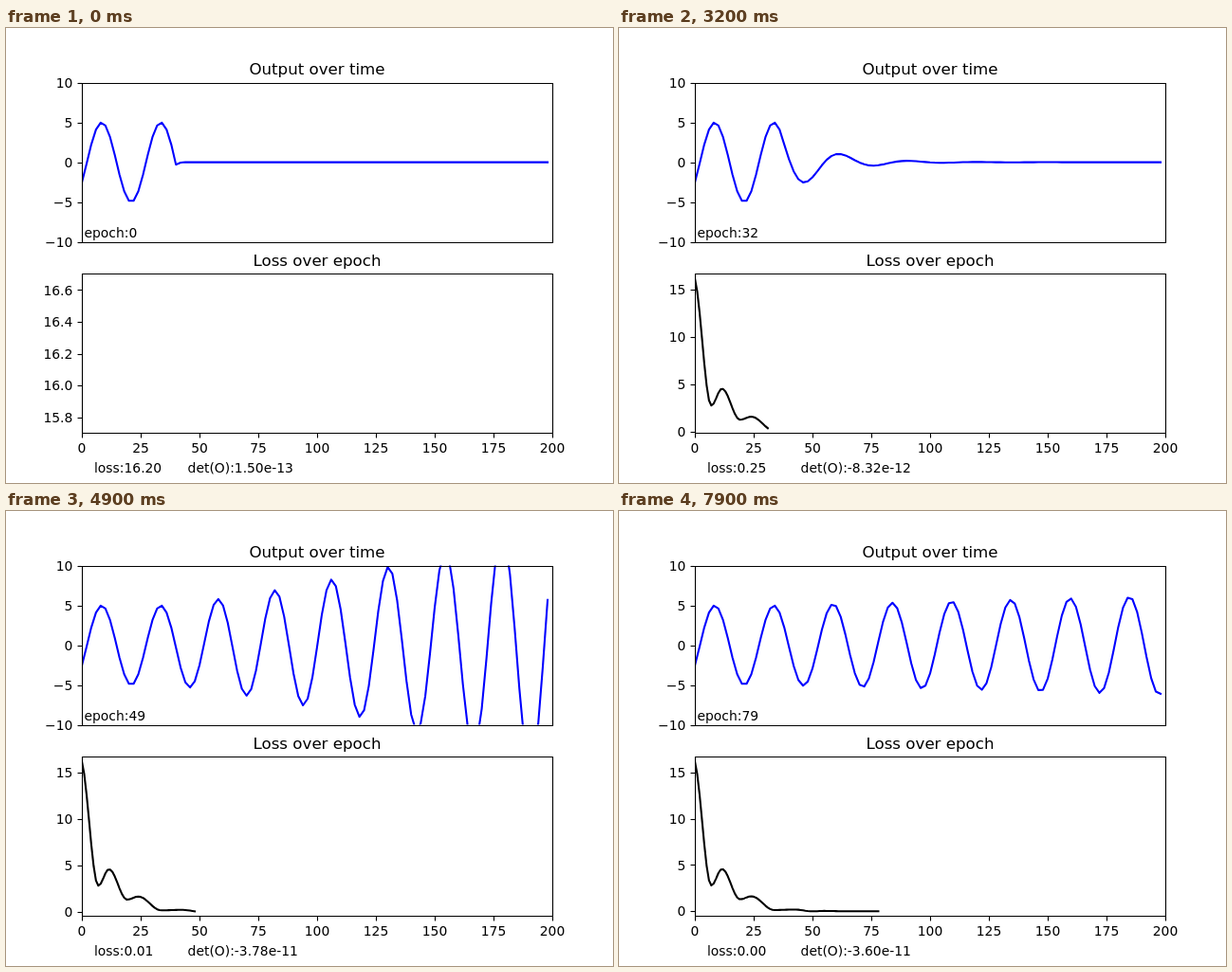
Write an HTML page that moves like this. It is 640 px wide and 480 px high and loops after 8 s.

```html
<!DOCTYPE html>
<html lang="en">
<head>
<meta charset="utf-8">
<title>Output and loss</title>
<style>
html, body { margin: 0; width: 100%; height: 100%; overflow: hidden; background: #fff; }
svg { display: block; width: 640px; height: 480px; font: 13.889px "DejaVu Sans", sans-serif; }
.title { font-size: 16.667px; text-anchor: middle; }
.axis { fill: none; stroke: #000; stroke-width: 1.11; }
.curve { fill: none; stroke-width: 2.083; stroke-linejoin: round; stroke-linecap: square; }
</style>
</head>
<body>
<svg viewBox="0 0 640 480">
  <defs>
    <clipPath id="upper"><rect x="80" y="57.6" width="496" height="168"/></clipPath>
    <clipPath id="lower"><rect x="80" y="259.2" width="496" height="168"/></clipPath>
  </defs>
  <g clip-path="url(#upper)"><path id="output" class="curve" stroke="#00f"/></g>
  <g clip-path="url(#lower)"><path id="loss" class="curve" stroke="#000"/></g>
  <path class="axis" d="M80.5 58.5H576.5V226.5H80.5ZM80.5 259.5H576.5V427.5H80.5Z"/>
  <text class="title" x="328" y="49">Output over time</text>
  <text class="title" x="328" y="251">Loss over epoch</text>
  <g id="fixedTicks"></g>
  <g id="lossTicks"></g>
  <text id="epochText" x="82.5" y="221"></text>
  <text id="lossText" x="93" y="469"></text>
  <text id="detText" x="191.6" y="469"></text>
</svg>
<script>
const EPOCHS = 80, EPOCH_MS = 100;
const $ = id => document.getElementById(id);
const px = x => 80 + 2.48 * x;

// Turning points of the loss: [epoch, loss]
const LOSS = [[-0.8, 16.5564], [7, 2.8], [11.5, 4.57], [19.2, 1.3], [24, 1.62],
  [33.7, 0.14], [42.5, 0.19], [50, 0], [55, 0.042], [63, 0.01], [80, 0]];

// Forecast weights: [epoch, a, b], where next = a * last + b * previous
const WEIGHTS = [[0, -0.08, -0.03], [10, 1, 0.3], [21, 0.937, -0.339], [32, 1.609, -0.783],
  [39, 1.91, -1.2], [43, 1.886, -1.182], [54, 1.656, -0.903], [59, 1.6747, -0.9193],
  [71, 1.8095, -1.0408], [79, 1.761, -1.0052]];

// Determinant: [epoch, multiple of 1e-13]
const DET = [[0, 1.5], [21, -6.31], [32, -83.2], [43, -426], [59, -298], [71, -365], [79, -360]];

const linear = u => u;
const smooth = u => (1 - Math.cos(Math.PI * u)) / 2;

function interpolate(keys, n, ease = linear) {
  const i = Math.max(1, keys.findIndex(k => k[0] >= n));
  const [from, ...start] = keys[i - 1], [to, ...end] = keys[i];
  const u = ease((n - from) / (to - from));
  return start.map((v, j) => v + (end[j] - v) * u);
}

const lossAt = n => interpolate(LOSS, n, smooth)[0];

// A given sine wave, continued by the two-term recurrence of this epoch.
function forecast(n) {
  const wave = Array.from({ length: 20 }, (_, k) => -5 * Math.cos(0.5 * k - 5.25));
  const [a, b] = interpolate(WEIGHTS, n);
  for (let k = 20; k < 100; k++) wave[k] = a * wave[k - 1] + b * wave[k - 2];
  return wave;
}

const path = points => points.length < 2 ? "" :
  "M" + points.map(p => p.map(v => v.toFixed(2)).join(" ")).join("L");

const snap = v => Math.floor(v + 0.5) + 0.5;

const yTick = (y, label) =>
  `<path class="axis" d="M80.5 ${snap(y)}H75.5"/>` +
  `<text x="70.3" y="${Math.round(y + 5.1)}" text-anchor="end">${label}</text>`;

const xTick = value =>
  `<path class="axis" d="M${snap(px(value))} 427.5V432.5"/>` +
  `<text x="${px(value)}" y="448" text-anchor="middle">${value}</text>`;

function lossTicks(low, high, toY) {
  const step = [0.2, 0.5, 1, 2, 2.5, 5].find(s => s >= (high - low) / 6 - 1e-9);
  let ticks = "";
  for (let i = Math.ceil(low / step); i * step <= high; i++)
    ticks += yTick(toY(i * step), (i * step).toFixed(step % 1 ? 1 : 0));
  return ticks;
}

function draw(n) {
  const limit = v => Math.max(-1e4, Math.min(1e4, v));
  $("output").setAttribute("d", path(forecast(n).map((v, k) => [px(2 * k), 141.6 - 8.4 * limit(v)])));

  const history = Array.from({ length: Math.max(1, n) }, (_, i) => lossAt(i));
  const low = Math.min(...history) - 0.5, high = Math.max(...history) + 0.5;
  const toY = v => 427.2 - 168 * (v - low) / (high - low);
  $("loss").setAttribute("d", path(history.map((v, i) => [px(i), toY(v)])));
  $("lossTicks").innerHTML = lossTicks(low, high, toY);

  $("epochText").textContent = "epoch:" + n;
  $("lossText").textContent = "loss:" + lossAt(n).toFixed(2);
  $("detText").textContent = "det(O):" + (interpolate(DET, n)[0] * 1e-13).toExponential(2);
}

let ticks = "";
for (let v = -10; v <= 10; v += 5) ticks += yTick(141.6 - 8.4 * v, String(v).replace("-", "\u2212"));
for (let v = 0; v <= 200; v += 25) ticks += xTick(v);
$("fixedTicks").innerHTML = ticks;

let shown = -1;
function tick() {
  const n = Math.floor(performance.now() / EPOCH_MS) % EPOCHS;
  if (n !== shown) draw(shown = n);
  requestAnimationFrame(tick);
}
tick();
</script>
</body>
</html>
```
